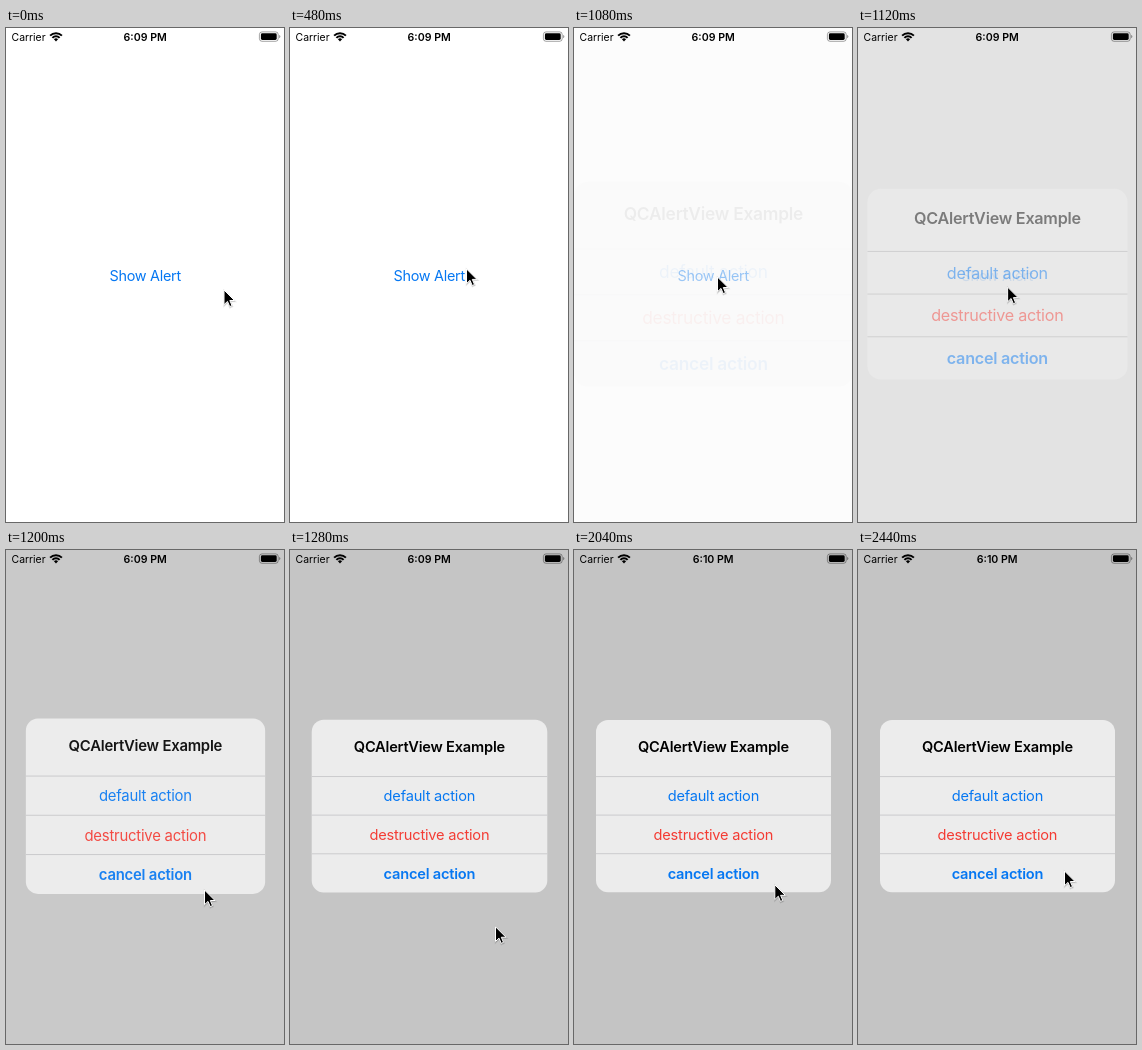
These frames come from a looping animation (278x494 px, 2480 ms). An HTML page:

```html
<!DOCTYPE html>
<html lang="en">
<head>
<meta charset="utf-8">
<title>Alert demo</title>
<style>
  html, body { margin: 0; width: 100%; height: 100%; overflow: hidden; background: #fff; }
  svg { display: block; width: 100vw; height: 100vh; }
  text { font-family: Inter, "Liberation Sans", sans-serif; }
  .label { font-size: 14.6px; letter-spacing: -0.21px; text-anchor: middle; fill: #0577f2; }
  .bold { font-weight: 600; }
  .status { font-size: 10.4px; }
  #button { font-size: 14.4px; letter-spacing: -0.26px; }
  #clock { font-size: 10.6px; text-anchor: middle; }
  #title { fill: #000; }
  #danger { fill: #f43b33; }
</style>
</head>
<body>
<svg viewBox="0 0 278 494">
  <rect width="278" height="494" fill="#fff"/>
  <text id="button" class="label" x="139.2" y="252.7">Show Alert</text>
  <rect id="dim" width="278" height="494"/>

  <g id="alert">
    <g id="card">
      <rect x="22" y="170" width="235" height="172.3" rx="12" fill="#ececec"/>
      <path d="M22 226.6H257M22 265.1H257M22 303.7H257" stroke="#c8c8ca" stroke-width="0.9"/>
    </g>
    <g id="content">
      <text id="title" class="label bold" x="139.4" y="202">QCAlertView Example</text>
      <text class="label" x="139.4" y="251.2">default action</text>
      <text id="danger" class="label" x="139.4" y="289.9">destructive action</text>
      <text class="label bold" x="139.4" y="328.6">cancel action</text>
    </g>
  </g>

  <text class="status" x="5.6" y="12.7">Carrier</text>
  <g fill="none" stroke="#000" stroke-width="2">
    <path d="M44.1 7.6A8.4 8.4 0 0 1 55.9 7.6"/>
    <path d="M46.4 9.9A5 5 0 0 1 53.6 9.9"/>
  </g>
  <path d="M50 13.4L47.9 11.3A3 3 0 0 1 52.1 11.3Z"/>
  <text id="clock" class="status bold" x="139.2" y="12.7">6:09 PM</text>
  <rect x="253.4" y="3.9" width="18.8" height="9.4" rx="2.6" fill="none" stroke="#000" stroke-opacity="0.4" stroke-width="0.9"/>
  <rect x="254.9" y="5.3" width="15.8" height="6.6" rx="1.4"/>
  <path d="M273.2 7A1.7 1.7 0 0 1 273.2 10.2Z" fill-opacity="0.45"/>

  <g id="cursor">
    <path d="M.6 1.6V16.8L4.2 13.4L6.4 18.6L9 17.5L6.8 12.4H11.6Z" fill-opacity="0.2" stroke="#000" stroke-opacity="0.1" stroke-width="1.6"/>
    <path d="M.5 1V15.7L4 12.4L6.2 17.6L8.5 16.6L6.3 11.5H11Z" stroke="#fff" stroke-width="1" stroke-linejoin="round"/>
  </g>
</svg>
<script>
const LOOP = 2480, STEP = 40;
const $ = id => document.getElementById(id);

const linear = u => u;
const easeIn = u => u * u;
const easeOut = u => 1 - (1 - u) ** 3;
const smooth = u => u * u * (3 - 2 * u);
const progress = (t, from, to) => Math.min(1, Math.max(0, (t - from) / (to - from)));

const home = { x: 217.5, y: 261 };
const moves = [
  { from: 0, to: 120, x: 184.5, y: 237.5, ease: smooth },
  { from: 440, to: 640, x: 142, y: 249.5, ease: linear },
  { from: 840, to: 1080, x: 143, y: 248, ease: linear },
  { from: 1080, to: 1200, x: 198, y: 339, ease: easeIn },
  { from: 1200, to: 1360, x: 206, y: 381, ease: easeOut },
  { from: 1920, to: 2120, x: 197.2, y: 308.2, ease: smooth },
  { from: 2280, to: 2440, x: 206, y: 320, ease: smooth }
];

function pointer(t) {
  let { x, y } = home;
  for (const m of moves) {
    const u = m.ease(progress(t, m.from, m.to));
    x += (m.x - x) * u;
    y += (m.y - y) * u;
  }
  return `${x} ${y}`;
}

// Critically damped spring from 0 to 1
function spring(t) {
  const w = 0.0303 * Math.max(0, t - 1068);
  return 1 - (1 + w) * Math.exp(-w);
}

function draw(ms) {
  const t = Math.floor((ms % LOOP) / STEP) * STEP;
  const p = spring(t);
  const scale = 1.2 - 0.2 * p;

  $("button").setAttribute("opacity", 1 - 0.58 * progress(t, 800, 960));
  $("dim").setAttribute("opacity", 0.231 * p);
  $("alert").setAttribute("transform",
    `translate(139.5 256.15) scale(${scale}) translate(-139.5 -256.15)`);
  $("card").setAttribute("opacity", Math.min(1, p * 1.5));
  $("content").setAttribute("opacity", p);
  $("clock").textContent = t < 1320 ? "6:09 PM" : "6:10 PM";
  $("cursor").setAttribute("transform", `translate(${pointer(t)})`);
}

const start = performance.now();
function tick() {
  draw(performance.now() - start);
  requestAnimationFrame(tick);
}
draw(0);
requestAnimationFrame(tick);
</script>
</body>
</html>
```
